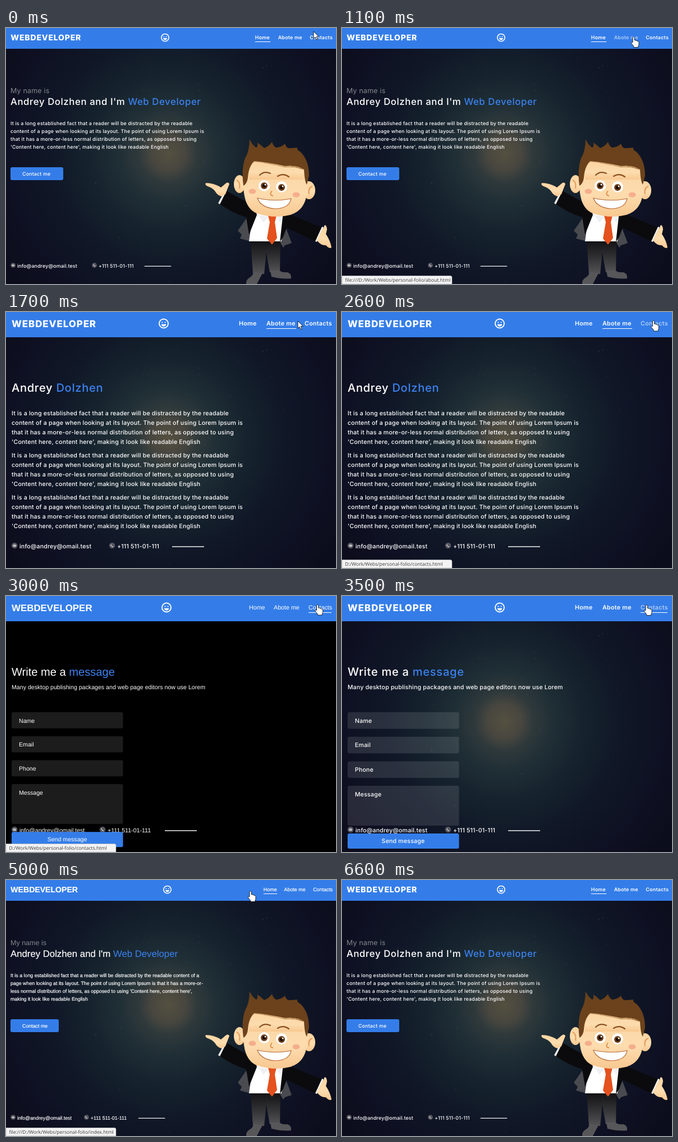
Write an HTML page that moves like this. It is 588 px wide and 456 px high and loops after 6700 ms.

```html
<!DOCTYPE html>
<html lang="en">
<head>
<meta charset="utf-8">
<title>Portfolio walkthrough</title>
<style>
  html, body { margin: 0; width: 588px; height: 456px; overflow: hidden; background: #000; }
  svg { display: block; }
  text { fill: #fff; white-space: pre; text-rendering: geometricPrecision; }
  .web { font-family: Inter, sans-serif; letter-spacing: .011em; font-weight: 500; }
  .web .nav { font-weight: 600; letter-spacing: .025em; }
  .web .head { letter-spacing: .035em; }
  .web .logo { font-weight: 800; letter-spacing: .055em; }
  .fallback { font-family: "Liberation Sans", Arial, sans-serif; }
  .fallback.small text { stroke: #fff; stroke-width: .2px; }
  .fallback.small .grey { stroke: none; }
  .logo { font-weight: 700; }
  .grey { fill: #85868c; font-weight: 400; }
  .blue { fill: #3b82f0; stroke: none; }
  #scene .status { font-family: "Open Sans", sans-serif; font-weight: 400; letter-spacing: 0; fill: #3c3c3c; stroke: none; }
</style>
</head>
<body>
<svg width="588" height="456" viewBox="0 0 588 456">
  <defs>
    <radialGradient id="glow" gradientUnits="userSpaceOnUse" cx="289" cy="223" r="350">
      <stop offset="0" stop-color="#555040"/>
      <stop offset=".09" stop-color="#47463f"/>
      <stop offset=".15" stop-color="#2f393b"/>
      <stop offset=".25" stop-color="#202f36"/>
      <stop offset=".4" stop-color="#16232e"/>
      <stop offset=".6" stop-color="#101727"/>
      <stop offset=".85" stop-color="#0e1022"/>
      <stop offset="1" stop-color="#0c0d1c"/>
    </radialGradient>
    <linearGradient id="skin" x2="0" y2="1">
      <stop offset="0" stop-color="#fad4a2"/>
      <stop offset=".6" stop-color="#fddcae"/>
      <stop offset="1" stop-color="#f8c890"/>
    </linearGradient>
    <linearGradient id="trousers" x2="0" y2="1">
      <stop offset="0" stop-color="#111113"/>
      <stop offset=".5" stop-color="#303032"/>
      <stop offset="1" stop-color="#545457"/>
    </linearGradient>
  </defs>

  <g id="space"><rect width="588" height="456" fill="url(#glow)"/></g>

  <g id="character">
    <g fill="url(#trousers)">
      <path d="M436 378H466L460 438H440Z"/>
      <path d="M460 378H489L488 435H470Z"/>
    </g>
    <g fill="#57575a">
      <path d="M441 435L457 437Q453 444 447 456H428Q427 448 435 444Q440 441 441 435Z"/>
      <path d="M471 432H488Q491 436 501 435Q509 437 508 446Q494 448 473 443Z"/>
    </g>
    <path fill="#4a4b50" d="M430 337L413 361L420 368L417 375L436 380L444 345Z"/>
    <path fill="#4a4b50" d="M492 338L509 383L497 387L494 391L485 376Z"/>
    <path fill="#fff" d="M440 330H495L491 380H433Z"/>
    <path fill="#eff0f3" d="M449 333L467 336L459 347ZM482 336L494 332L489 348Z"/>
    <path fill="#e4511d" d="M467 334H482L479 346L483 374L474 386L465 375L470 346Z"/>
    <path fill="#0b0b0d" d="M393 290Q413 302 443 317L447 333L433 368L428 337Q402 329 380 313Z"/>
    <path fill="#0b0b0d" d="M494 327Q526 340 563 355L551 380Q520 365 500 356L494 372L488 381Z"/>
    <path fill="#f4f4f6" d="M390 290L393 290L381 314L378 312ZM563 354L566 355L554 381L551 380Z"/>
    <g fill="url(#skin)">
      <path d="M391 296Q395 285 398 278Q396 272 389 279L383 284Q370 276 356 276Q353 280 362 283Q370 286 374 293Q377 298 384 300Z"/>
      <path d="M563 359Q567 356 567 352Q571 349 572 359L570 367Q578 379 580 391Q576 394 570 387Q561 388 554 378Z"/>
      <ellipse cx="416" cy="278" rx="10" ry="16"/>
      <ellipse cx="540" cy="289" rx="11" ry="16"/>
      <path d="M428 236L534 240Q541 268 536 294Q533 325 506 333Q480 340 449 331Q428 324 424 294Q420 270 428 236Z"/>
    </g>
    <path fill="none" stroke="#e29a58" stroke-width="2" d="M411 271Q418 274 416 286M546 282Q538 284 540 296"/>
    <path fill="#6b421b" stroke="#f2b878" stroke-width="1" d="M433 262Q433 238 443 237Q468 240 497 247Q520 245 531 252Z"/>
    <path fill="url(#skin)" d="M432 263Q433 239 444 238Q468 241 497 248Q520 246 532 254L530 270H434Z"/>
    <path fill="#6b421b" d="M423 281Q419 252 426 232Q434 219 434 198Q439 209 446 213Q449 211 448 204Q455 209 460 214Q468 211 474 203Q476 210 481 213Q490 213 497 206Q498 211 503 214Q511 214 519 213Q518 218 524 220Q540 235 540 263L536 279Q532 274 531 252Q520 244 497 246Q466 239 442 237Q432 248 431 266Q430 277 423 281Z"/>
    <path fill="none" stroke="#8a5220" stroke-linecap="round" stroke-width="2.2" d="M452 262Q460 254 471 259M484 264Q494 258 504 265"/>
    <g fill="#fff"><circle cx="460" cy="281" r="10"/><circle cx="491" cy="283" r="10"/></g>
    <g fill="#6a3a16"><circle cx="460" cy="281" r="6"/><circle cx="491" cy="284" r="6"/></g>
    <g fill="#120a05"><circle cx="460" cy="281" r="3"/><circle cx="491" cy="284" r="3"/></g>
    <g fill="#fff"><circle cx="462" cy="279" r="1.5"/><circle cx="493" cy="282" r="1.5"/></g>
    <g fill="#f5ae8c"><ellipse cx="439" cy="291" rx="6.5" ry="4.5"/><ellipse cx="517" cy="297" rx="6.5" ry="4.5"/></g>
    <path fill="none" stroke="#e0934f" stroke-width="2" d="M474 290Q468 298 476 299"/>
    <path fill="#fff" stroke="#b8672f" stroke-width="1.2" d="M448 303Q478 310 508 304Q505 321 480 322Q454 320 448 303Z"/>
  </g>

  <g id="scene"></g>
</svg>

<script>
const LOOP = 6700, STEP = 100, W = 588, H = 456;
const BLUE = '#347de9';
const FIRST = 'Andrey', LAST = 'Dolzhen';
const EMAIL = 'info@andrey@omail.test', PHONE = '+111 511-01-111';
const FOLDER = 'D:/Work/Webs/personal-folio/';

const $ = id => document.getElementById(id);

// Faint stars, denser near the glow
let seed = 7;
const random = () => (seed = seed * 16807 % 2147483647) / 2147483647;
let stars = '';
for (let i = 0; i < 130; i++) {
  const angle = random() * 2 * Math.PI, reach = 25 + 235 * random();
  stars += `<circle cx="${289 + reach * Math.cos(angle)}" cy="${223 + reach * Math.sin(angle)}"
    r="${.4 + random()}" fill="#7fa3a0" opacity="${.04 + .1 * random()}"/>`;
}
$('space').innerHTML += stars;

const visits = [
  { from: 0, page: 'home', loaded: true },
  { from: 1500, page: 'about' },
  { from: 1600, page: 'about', loaded: true },
  { from: 3000, page: 'contacts' },
  { from: 3100, page: 'contacts', loaded: true },
  { from: 5000, page: 'home' },
  { from: 5100, page: 'home', loaded: true },
];
const statuses = [
  { from: 1100, to: 1700, url: `file:///${FOLDER}about.html` },
  { from: 2200, to: 3400, url: `${FOLDER}contacts.html` },
  { from: 4600, to: 5300, url: `file:///${FOLDER}index.html` },
];
// time, x, y of the pointer tip
const track = [
  [0, 548, 6], [300, 548, 6], [600, 543, 8], [1000, 520, 16], [1700, 520, 16],
  [2100, 538, 16], [2300, 551, 16], [2400, 551, 16], [2600, 555.5, 15.5], [3000, 555.5, 15.5],
  [3500, 543, 16], [3600, 541, 16], [4300, 453, 19], [4700, 436, 20], [5100, 436, 20], [5600, 600, 14],
];

function pointerAt(t) {
  const i = track.findIndex(key => key[0] > t);
  if (i < 0) return null;
  const [t0, x0, y0] = track[i - 1], [t1, x1, y1] = track[i];
  const p = (t - t0) / (t1 - t0);
  return { x: x0 + (x1 - x0) * p, y: y0 + (y1 - y0) * p };
}

const text = (x, y, size, content, cls = '', extra = '') =>
  `<text x="${x}" y="${y}" font-size="${size}" class="${cls}" ${extra}>${content}</text>`;
const box = (x, y, w, h, fill, r = 0) =>
  `<rect x="${x}" y="${y}" width="${w}" height="${h}" rx="${r}" fill="${fill}"/>`;
const blue = word => `<tspan class="blue">${word}</tspan>`;
const lines = (x, y, size, gap, rows) =>
  rows.map((row, i) => text(x, y + i * gap, size, row)).join('');

const passage = loaded => loaded ? [
  'It is a long established fact that a reader will be distracted by the readable',
  'content of a page when looking at its layout. The point of using Lorem Ipsum is',
  'that it has a more-or-less normal distribution of letters, as opposed to using',
  "'Content here, content here', making it look like readable English",
] : [
  'It is a long established fact that a reader will be distracted by the readable content of a',
  'page when looking at its layout. The point of using Lorem Ipsum is that it has a more-or-',
  "less normal distribution of letters, as opposed to using 'Content here, content here',",
  'making it look like readable English',
];

function navLinks(loaded, k) {
  const spans = loaded ? [[415, 448], [464, 517], [532, 580]] : [[433, 462], [477, 523], [539, 580]];
  return ['home', 'about', 'contacts'].map((page, i) => ({
    page, label: ['Home', 'Abote me', 'Contacts'][i],
    left: W - (W - spans[i][0]) * k, right: W - (W - spans[i][1]) * k,
  }));
}

function header(page, loaded, k, links, hovered) {
  const smileX = loaded ? (k < 1 ? 283.5 : 281) : (k < 1 ? 287.5 : 286);
  const nav = links.map(link => {
    const underline = link.page === page
      ? box(link.left, Math.floor(30 * k - .5), link.right - link.left, 1, '#fff') : '';
    return text(link.left, 24.3 * k, 10.7 * k, link.label, 'nav',
      `opacity="${link === hovered ? .6 : 1}"`) + underline;
  }).join('');
  return box(0, 0, W, Math.round(44.6 * k), BLUE)
    + text(10 * k, 26.7 * k, 16.9 * k, 'WEBDEVELOPER', 'logo')
    + `<g transform="translate(${smileX} ${20.5 * k}) scale(${k})" fill="#fff">
        <circle r="8" fill="none" stroke="#fff" stroke-width="1.900"/>
        <circle cx="-2.600" cy="-2" r="1.100"/><circle cx="2.600" cy="-2" r="1.100"/>
        <path d="M-4.300 1.200H4.300Q3.700 5.200 0 5.200T-4.300 1.200Z"/></g>` + nav;
}

function footer(loaded, k) {
  const phoneX = loaded ? 198 : 181, lineX = loaded ? 296 : 283;
  return `<g transform="translate(0 ${H * (1 - k)}) scale(${k})">
    <g fill="#55565f"><circle cx="15.200" cy="416" r="5.300"/><circle cx="${phoneX - 9}" cy="416" r="5.300"/></g>
    <rect x="12.500" y="414.200" width="5.400" height="3.700" rx=".8" fill="#ddd"/>
    <path d="M12.700 414.500l2.500 1.900 2.500-1.900" fill="none" stroke="#55565f" stroke-width=".7"/>
    <path d="M${phoneX - 11} 414q.5 3.500 4 4.300" fill="none" stroke="#ddd" stroke-width="1.300"/>
    ${text(24, 421.3, 10.6, EMAIL)}${text(phoneX, 421.3, 10.6, PHONE)}
    ${box(lineX, 417.3, 57, 1.4, '#fff')}</g>`;
}

const content = {
  home: loaded =>
    text(8, 116, 12.5, 'My name is', 'grey')
    + text(8, 137.3, 16.75, `${FIRST} ${LAST} and I'm ${blue('Web Developer')}`, 'head')
    + lines(8, 173, 8.84, 14.15, passage(loaded))
    + box(8, 248, loaded ? 94 : 86, 23, BLUE, 3)
    + text(29, 263.3, 8.84, 'Contact me'),

  about: loaded =>
    text(10, 142, 20.1, `${FIRST} ${blue(LAST)}`, 'head')
    + [184, 259, 334].map(y => lines(10, y, 10.61, 17, passage(loaded))).join(''),

  contacts: loaded => {
    const pitch = loaded ? 43.7 : 42.7, height = loaded ? 29.5 : 28.8;
    const fields = ['Name', 'Email', 'Phone', 'Message'].map((label, i) => {
      const y = 207 + i * pitch;
      return box(10, y, 198.5, label === 'Message' ? 71 : height, 'rgba(255,255,255,.11)', 3)
        + text(23, y + 18.5, 10.6, label);
    }).join('');
    const buttonY = loaded ? 423 : 420.3;
    return text(10, 142, 20.1, `Write me a ${blue('message')}`, 'head')
      + text(10, 166, 10.61, 'Many desktop publishing packages and web page editors now use Lorem')
      + fields + box(10, buttonY, 198.5, 27, BLUE, 3)
      + text(109, buttonY + 17, 10.6, 'Send message', '', 'text-anchor="middle"');
  },
};

const statusBar = url => `<svg y="441" width="196.500" height="15">
  <path d="M0 .5H193Q196 .5 196 3.500V15H0Z" fill="#f3f3f4" stroke="#b9b9bb" stroke-width=".7"/>
  ${text(5.5, 11.2, 8.6, url, 'status')}</svg>`;

const shapes = {
  arrow: 'M0 0V13L3 10.300 5 15 7.200 14 5.200 9.400H9.200Z',
  hand: 'M-2 1.500C-2-.6 1.200-.6 1.200 1.500V6C1.500 5 4 5.200 4 7 4.500 6 6.500 6.300 6.600 8 7.500 7.300 9 8 9 9.500V13C9 15 7.600 16 7.600 18.500H0C0 16-2 14.500-4 12-5.500 10-4 8.500-2 10Z',
};
const pointerShape = ({ x, y }, kind) =>
  `<path transform="translate(${x} ${y})" d="${shapes[kind]}" fill="#fff" stroke="#111" stroke-width=".9" stroke-linejoin="round"/>`;

function draw(t) {
  const { page, loaded } = visits.findLast(v => v.from <= t);
  const home = page === 'home', k = home ? 5 / 6 : 1;
  const pointer = pointerAt(t);
  const links = navLinks(loaded, k);
  const over = pointer && links.find(l =>
    pointer.x >= l.left && pointer.x <= l.right && pointer.y > 10 * k && pointer.y < 31 * k);
  const status = statuses.find(s => t >= s.from && t < s.to);

  $('space').style.display = loaded || home ? '' : 'none';
  $('character').style.display = home ? '' : 'none';
  $('scene').setAttribute('class', `${loaded ? 'web' : 'fallback'} ${home ? 'small' : ''}`);
  $('scene').innerHTML = header(page, loaded, k, links, loaded && over)
    + footer(loaded, k) + content[page](loaded)
    + (status ? statusBar(status.url) : '')
    + (pointer ? pointerShape(pointer, over || !loaded ? 'hand' : 'arrow') : '');
}

let shown = -1;
function tick() {
  const t = Math.floor(performance.now() % LOOP / STEP) * STEP;
  if (t !== shown) draw(shown = t);
  requestAnimationFrame(tick);
}
tick();
</script>
</body>
</html>
```
